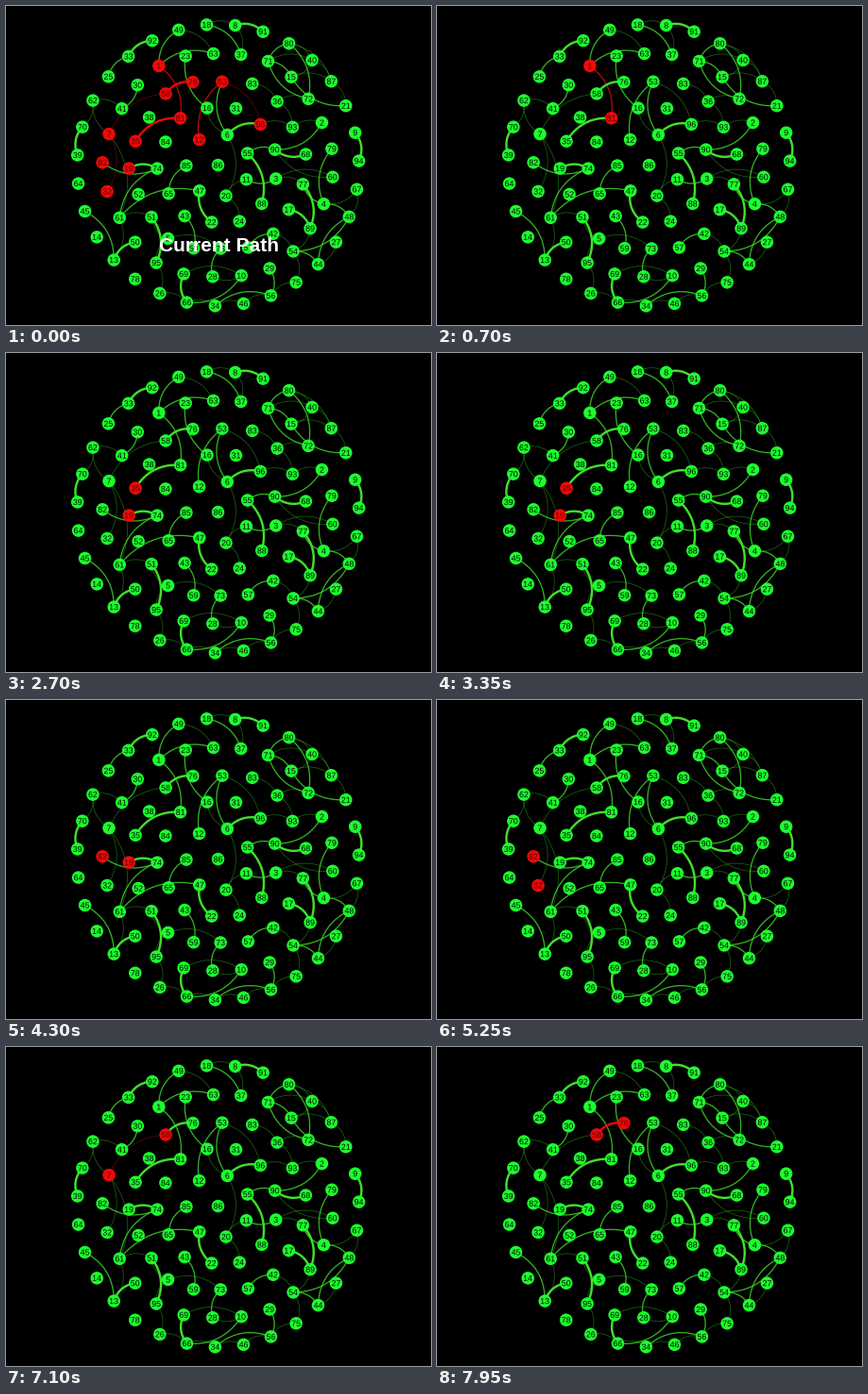
These frames come from a looping animation (450x338 px, 8000 ms). A matplotlib script:

```python
import numpy as np
import matplotlib.pyplot as plt
from matplotlib.animation import FuncAnimation
from matplotlib.collections import EllipseCollection, LineCollection, PathCollection
from matplotlib.path import Path
from matplotlib.textpath import TextPath

W, H, DPI = 450, 338, 100
PT = 72 / DPI
STEP = 50
FRAMES = 160
INTRO = 500
HOP = 1000

GREEN, RED = "#1cff2e", "#f20808"
EDGE_GREEN, EDGE_RED = (0.25, 0.88, 0.16), (0.90, 0.04, 0.04)
LABEL, LABEL_RED = "#000000", "#500000"

CX, CY = 224.5, 168.6
pos = {86: (CX, CY)}


def ring(k, start, swing, phase, labels):
    """Place 6k + 1 nodes clockwise on a slightly hexagonal ring."""
    labels = [int(v) for v in labels.split()]
    base = start - 360 * np.arange(len(labels)) / len(labels)
    ang = np.radians(base + swing * np.cos(np.radians(base + phase)))
    bulge = 3 * np.sin(np.pi * (k - 1) / 4)
    r = 4.7 + 28.9 * k + bulge * np.cos(6 * ang)
    pos.update(zip(labels, zip(CX + r * np.cos(ang), CY - r * np.sin(ang))))


ring(1, 76.3, -3.5, -60, "6 55 11 20 47 85 12")
ring(2, 99.0, -2.0, 55, "16 31 96 90 3 88 24 22 43 65 74 84 81")
ring(3, 84.9, -3.5, 45,
     "53 83 36 93 68 77 17 42 57 73 59 5 51 52 19 35 38 58 76")
ring(4, 93.5, 1.6, 40,
     "63 37 71 15 72 2 79 60 4 89 54 29 10 28 69 95 50 61 32 82 7 41 30 1 23")
ring(5, 83.0, 0.0, 0,
     "8 91 80 40 87 21 9 94 67 48 27 44 75 56 46 34 66 26 78 13 14 45 64 39 "
     "70 62 25 33 92 49 18")

# Every edge bulges to the left of its direction of travel.
THICK = """8-91 35-81 58-76 6-96 19-74 22-47 51-95 13-50 17-89 77-89 55-88
68-90 9-94 39-70 66-69 33-92"""
MEDIUM = """25-33 1-49 1-63 1-81 18-37 16-23 12-53 6-53 30-41 61-74 74-82
65-85 61-47 45-13 43-59 28-73 10-66 29-56 34-56 48-54 44-48 54-44 4-77 4-79
4-48 2-90 55-90 3-11 57-42 71-80 72-71 80-72 21-15 71-15"""
THIN = """49-63 18-8 8-37 7-58 62-41 7-62 62-70 53-96 7-32 7-61 6-16 96-93
83-36 36-72 36-93 93-2 80-40 80-87 40-87 87-21 71-40 15-87 40-15 61-51 61-13
5-51 95-5 5-73 10-28 26-66 95-26 66-34 34-46 46-56 56-75 69-10 42-54 27-44
67-48 67-4 3-77 3-60 60-90 20-11 6-20 20-24 89-54 54-75"""
WEIGHTS = ((THIN, 0.8, 0.42), (MEDIUM, 1.3, 0.8), (THICK, 2.4, 1.0))

PATH = [1, 81, 35, 19, 82, 32, 7, 58, 76, 12, 53, 96]


def curve(a, b, bend=0.3):
    p, q = np.array(pos[a]), np.array(pos[b])
    dx, dy = q - p
    ctrl = (p + q) / 2 + bend * np.array([dy, -dx])
    t = np.linspace(0, 1, 25)[:, None]
    return (1 - t) ** 2 * p + 2 * t * (1 - t) * ctrl + t ** 2 * q


def glyphs(label):
    path = TextPath((0, 0), str(label), size=8.8,
                    prop={"family": "Liberation Sans"})
    box = path.get_extents()
    mid = np.array([(box.x0 + box.x1) / 2, (box.y0 + box.y1) / 2])
    return Path((path.vertices - mid) * [1, -1] + pos[label], path.codes)


edges, widths, alphas = [], [], []
for group, width, alpha in WEIGHTS:
    for pair in group.split():
        edges.append(tuple(int(v) for v in pair.split("-")))
        widths.append(width * PT)
        alphas.append(alpha)

fig = plt.figure(figsize=(W / DPI, H / DPI), dpi=DPI, facecolor="black")
ax = fig.add_axes([0, 0, 1, 1])
ax.set_xlim(0, W)
ax.set_ylim(H, 0)
ax.axis("off")

labels = list(pos)
size = np.full(len(labels), 13.5)
lines = LineCollection([curve(a, b) for a, b in edges], linewidths=widths, zorder=1)
nodes = EllipseCollection(size, size, np.zeros(len(labels)), units="xy",
                          offsets=[pos[n] for n in labels],
                          offset_transform=ax.transData, linewidths=0, zorder=2)
numbers = PathCollection([glyphs(n) for n in labels], linewidths=0, zorder=3)
for artist in (lines, nodes, numbers):
    ax.add_collection(artist, autolim=False)
title = ax.text(225, 260, "Current Path", color="white", ha="center",
                va="baseline", family="Liberation Sans", weight="bold",
                fontsize=21 * PT, zorder=4)


def draw(frame):
    t = frame * STEP
    intro = t < INTRO
    hop = (t - INTRO) // HOP
    active = PATH if intro else PATH[hop:hop + 2]
    steps = [{a, b} for a, b in zip(active, active[1:])]

    lines.set_color([(EDGE_RED if {a, b} in steps else EDGE_GREEN) + (alpha,)
                     for (a, b), alpha in zip(edges, alphas)])
    nodes.set_facecolor([RED if n in active else GREEN for n in labels])
    numbers.set_facecolor([LABEL_RED if n in active else LABEL for n in labels])
    title.set_visible(intro)
    return lines, nodes, numbers, title


anim = FuncAnimation(fig, draw, frames=FRAMES, init_func=lambda: draw(0),
                     interval=STEP, repeat=True, repeat_delay=0)
plt.show()
```
